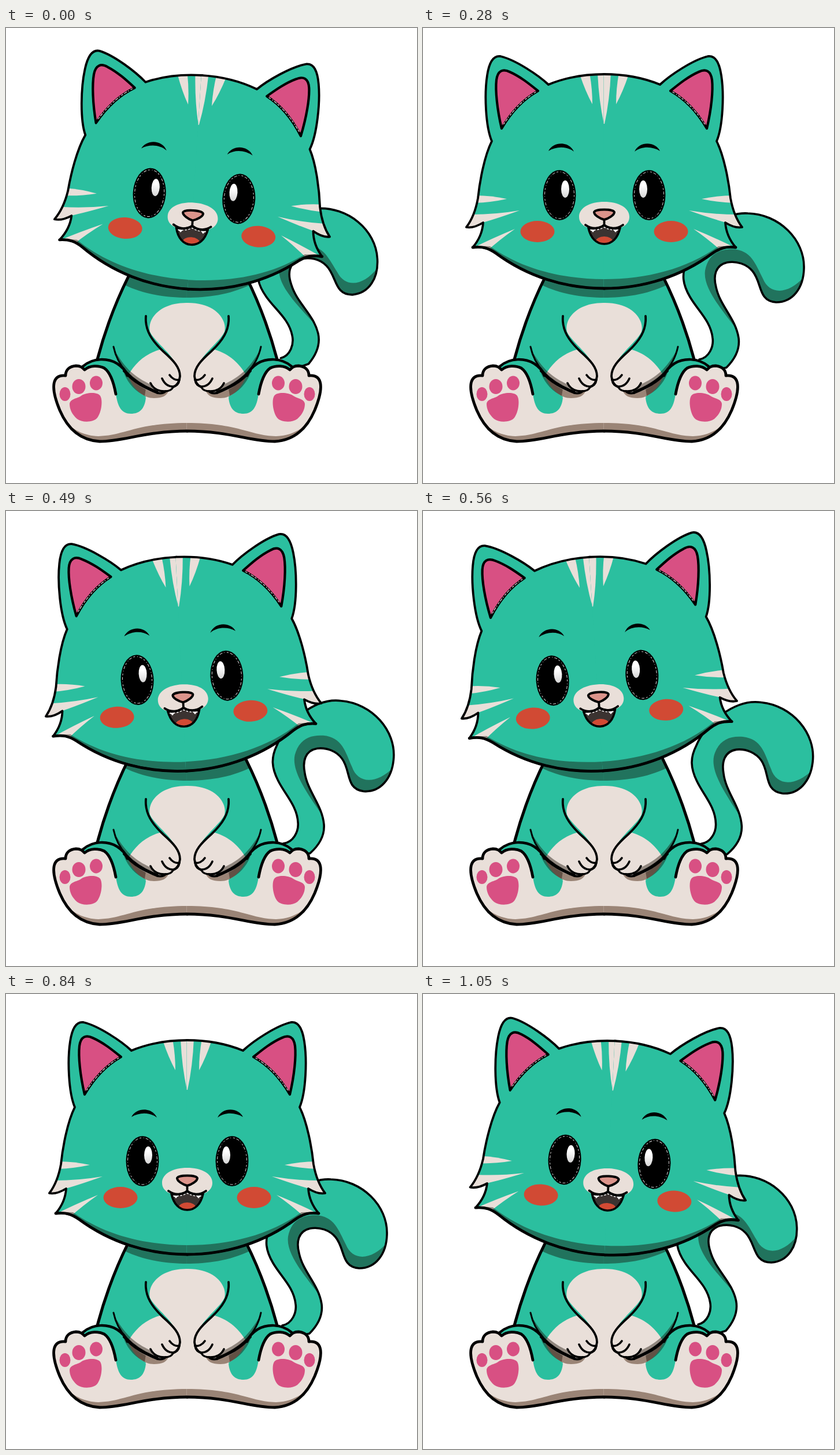
Write an HTML page that moves like this. It is 711 by 788 pixels and loops after 1.12 s.

```html
<!DOCTYPE html>
<html lang="en">
<head>
<meta charset="utf-8">
<title>Kitten</title>
<style>
  html, body { margin: 0; width: 100%; height: 100%; overflow: hidden; background: #fff; }
  svg { display: block; width: 100%; height: 100%; }
</style>
</head>
<body>
<svg id="stage" viewBox="0 0 711 788"></svg>
<script>
const GREEN = '#2bbf9f', CREAM = '#e9dfd9', PINK = '#d85083', RED = '#d14a34', TAN = '#9a8476';

const fill = (d, color, extra = '') => `<path d="${d}" fill="${color}" ${extra}/>`;
const line = (d, width = 4, color = '#000', extra = '') =>
  `<path d="${d}" fill="none" stroke="${color}" stroke-width="${width}" stroke-linecap="round" stroke-linejoin="round" ${extra}/>`;
const oval = (x, y, rx, ry, color, extra = '') =>
  `<ellipse cx="${x}" cy="${y}" rx="${rx}" ry="${ry}" fill="${color}" ${extra}/>`;
const shade = d => fill(d, '#150a00', 'opacity=".42"');
const clip = (id, d) => `<clipPath id="${id}"><path d="${d}"/></clipPath>`;
const clipped = (id, content) => `<g clip-path="url(#${id})">${content}</g>`;
// Draws a left half and its reflection about the body axis.
const mirror = half => `<g>${half}</g><g transform="matrix(-1 0 0 1 627 0)">${half}</g>`;

function tail() {
  const outline = 'M478 574 C495 571 503 552 501 537 C498 508 476 490 462 466 C449 444 447 427 456 405 ' +
    'C468 366 515 318 562 321 C615 322 661 366 659 417 C658 450 640 475 611 475 ' +
    'C579 473 587 441 570 421 C560 409 543 403 526 406 C505 411 502 430 507 449 ' +
    'C514 482 541 503 546 537 C549 560 535 578 525 588 L490 597';
  const shadow = 'M538 516 C512 482 484 448 488 420 C493 394 510 383 535 383 ' +
    'C568 384 575 409 588 434 C600 463 632 462 660 430 L650 485 L590 485 L550 425 L525 415 L515 440 Z';
  return clip('tailClip', outline) + fill(outline, GREEN) + clipped('tailClip', shade(shadow)) + line(outline, 3.6);
}

function body() {
  const torso = 'M314.5 425 L212 430 C187 480 171 525 158 574 L160 620 L314.5 650';
  const base = 'M314.5 698 C240 698 205 716 162 716 C125 714 105 690 93 662 C86 645 81 628 83 616 ' +
    'C85 604 93 601 103 602 C103 592 110 586 121 585 C129 585 132 588 136 592 ' +
    'C145 584 160 584 170 589 C180 596 186 612 190 634 L314.5 640';
  const footLine = base.replace(' L314.5 640', '');
  const belly = 'M314.5 476 C265 475 244 505 249 526 C258 546 300 572 300 603 L270 630 L240 640 L314.5 645';
  const thigh = 'M133 586 C151 570 177 572 197 586 L240 622 L242 640 C240 660 231 668 216 668 ' +
    'C200 668 193 656 190 633 C186 610 181 596 170 589 C160 584 145 584 136 591 Z';
  const paw = 'M211 602 C224 580 240 565 266 557 C286 573 301 588 301 603 C300 613 296 619 290 621 ' +
    'C286 628 277 630 269 630 C258 637 225 620 211 602 Z';
  const pad = 'M110 651 C111 642 123 642 130 637 C139 631 158 630 163 637 C168 645 165 666 158 675 ' +
    'C152 683 132 684 123 677 C114 669 110 660 110 651 Z';
  const toes = [[102, 634, 9.5, 12], [126, 621, 11.5, 13], [156, 615, 11, 12.5]];

  return mirror(
    fill(torso, GREEN) +
    shade('M314.5 430 L213 430 L205 445 C240 462 280 467 314.5 467 Z') +
    line('M212 430 C187 480 171 525 158 574', 5)
  ) + mirror(
    fill(base, CREAM) +
    fill('M314.5 684 C225 684 205 706 160 707 C135 706 119 697 106 685 C118 705 140 715 162 715 C205 715 240 698 314.5 698 Z', TAN) +
    fill(thigh, GREEN) +
    fill(belly, CREAM) +
    fill('M211 603 C222 628 238 641 256 641 C270 641 279 637 281 628 L260 620 Z', TAN) +
    shade('M204 598 C212 617 224 629 240 637 L242 624 Z') +
    fill(paw, CREAM) +
    shade('M187 556 C197 592 222 617 262 631 L250 617 C225 606 205 590 187 556 Z') +
    line('M133 586 C151 570 177 572 192 581 C203 588 208 596 210 602', 4.5) +
    line(footLine, 4.8) +
    line('M186 552 C193 586 216 612 262 630', 3) +
    line('M204 594 C222 615 240 623 262 632', 4) +
    line('M242 499 C240 524 253 542 272 560 C290 576 301 588 301 603 C300 614 296 619 289 622', 3.8) +
    line('M250 615 C254 624 263 629 274 629 C282 629 288 626 289 621 C280 621 274 616 270 607 M289 621 C296 620 299 616 300 609 C294 611 287 607 283 601', 3.6) +
    line('M262 632 C268 633 273 632 276 629', 4) +
    toes.map(t => oval(...t, PINK)).join('') + fill(pad, PINK)
  );
}

function head() {
  const outline = 'M314.5 80 C278 80 246 86 217 98 C200 82 160 55 134 49 C120 47 114 62 111 82 ' +
    'C106 114 108 170 119 196 C106 222 98 266 95 295 C91 317 84 333 75 345 ' +
    'C86 347 96 342 104 337 C103 354 97 367 86 380 C103 378 113 381 126 390 C180 430 245 451 314.5 451';
  const innerEar = 'M136 174 C128 140 125 108 127 90 C129 74 138 70 150 76 C168 84 183 96 199 109 C172 124 153 145 136 174 Z';
  const mouth = 'M286 346 C295 349 304 347 313.5 342 C323 347 332 349 341 346 C337 364 327 374 313.5 374 C300 374 290 364 286 346 Z';
  const dots = 'stroke-dasharray="3 4 1 3 5 3" opacity=".85"';

  const side =
    fill(outline, GREEN) +
    clipped('headClip',
      fill('M271 80 L288 77 Q293 105 293 132 Q281 110 271 80 Z', CREAM) +
      fill('M302 77 H314.5 V166 H313 Q304 125 302 77 Z', CREAM) +
      fill('M90 290 Q118 290 145 296 Q118 302 90 303 Z', CREAM) +
      fill('M84 323 Q125 323 167 316 Q128 330 103 337 L75 348 Z', CREAM) +
      fill('M84 382 Q120 364 159 348 Q132 367 111 386 Z', CREAM) +
      shade('M84 377 L116 378 C170 417 240 435 314.5 435 V452 L200 450 L84 385 Z')) +
    line(outline, 3.8) +
    line('M86 380 C103 378 113 381 126 390 C180 430 245 451 314.5 451', 4.8) +
    fill(innerEar, PINK) + line(innerEar, 4.2) +
    line('M195 111 C170 126 153 146 138 169', 1.2, '#fff', dots) +
    fill('M217 213 C225 197 252 195 261 214 C248 204 230 205 217 213 Z', '#000') +
    oval(236, 289.5, 28.5, 43.5, '#000') +
    oval(236, 289.5, 25.5, 40.5, 'none', `stroke="#fff" stroke-width="1" ${dots}`) +
    oval(246, 279, 7, 15, 'url(#glint)') +
    oval(198, 352.5, 29.5, 18.5, RED);

  const muzzle =
    fill('M313.5 301 C338 301 357 311 357 327 C357 341 343 348 330 347 L313.5 341 L297 347 C284 348 270 341 270 327 C270 311 289 301 313.5 301 Z', CREAM) +
    fill(mouth, '#3b3331') +
    clipped('mouthClip', oval(313.5, 370, 15, 9, RED) +
      fill('M287 346 L299 348 L294 354 Z M340 346 L328 348 L333 354 Z', '#fff')) +
    line('M290 350 C300 350 306 349 313.5 345 C321 349 327 350 337 350', 1.6, '#fff', 'stroke-dasharray="2 4"') +
    line(mouth, 3.6) +
    line('M281 341 C292 349 305 348 313.5 341 C322 348 335 349 346 341 M313.5 333 V341', 3.8) +
    fill('M313.5 332 C306 330 296 324 296 319 C298 313 329 313 331 319 C331 324 321 330 313.5 332 Z', '#dc948b',
      'stroke="#000" stroke-width="4"');

  return clip('headClip', outline) + clip('mouthClip', mouth) + mirror(side) + muzzle;
}

const stage = document.getElementById('stage');
stage.innerHTML =
  `<defs><linearGradient id="glint" x1="0" y1="0" x2="0" y2="1">
    <stop offset=".3" stop-color="#fff"/><stop offset="1" stop-color="#d5d5d5"/>
  </linearGradient></defs>
  <g id="tail">${tail()}</g>${body()}<g id="head">${head()}</g>`;

const headGroup = document.getElementById('head');
const tailGroup = document.getElementById('tail');
const STEP = 70, STEPS = 16;

function pose(ms) {
  const step = Math.floor(ms / STEP) % STEPS;
  const sway = Math.abs(step - STEPS / 2) / 4 - 1;
  headGroup.setAttribute('transform', `rotate(${3.65 * sway} 296 478)`);
  tailGroup.setAttribute('transform', `rotate(${-4.85 * sway} 450 604)`);
}

let start;
function tick(now) {
  start ??= now;
  pose(now - start);
  requestAnimationFrame(tick);
}
pose(0);
requestAnimationFrame(tick);
</script>
</body>
</html>
```
